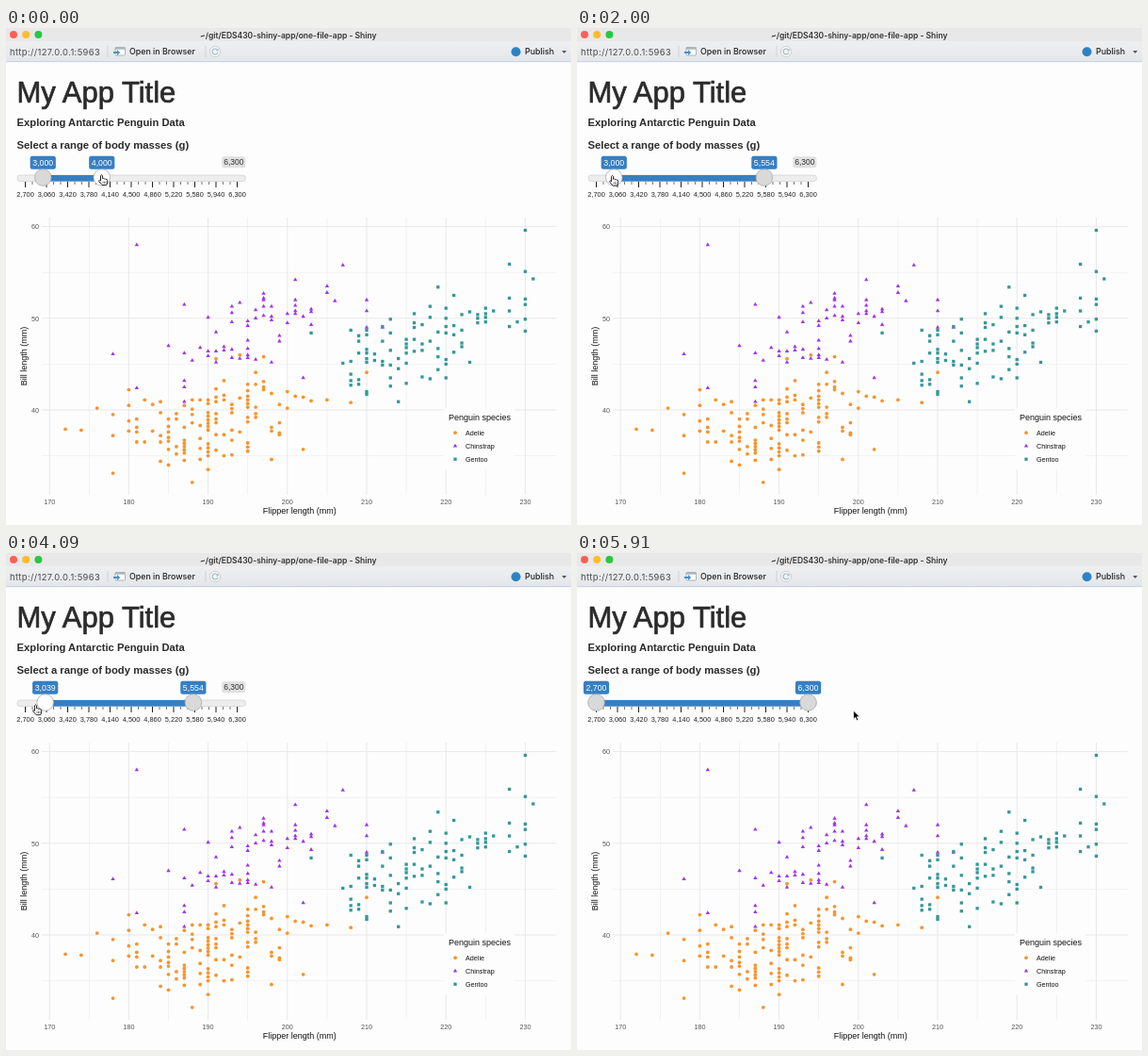
Write an HTML page that moves like this. It is 600 px wide and 527 px high and loops after 5.94 s.

```html
<!DOCTYPE html>
<html lang="en">
<head>
<meta charset="utf-8">
<title>Slider demo</title>
<style>
html, body { margin: 0; width: 100%; height: 100%; overflow: hidden; background: #fdfdfd; }
svg { display: block; width: 100%; height: 100%; font-family: "Liberation Sans", Arial, sans-serif; }
.ui { font-family: Inter, sans-serif; }
.b { font-weight: bold; }
.m { text-anchor: middle; }
.e { text-anchor: end; }
</style>
</head>
<body>
<svg id="stage" viewBox="0 0 600 527"></svg>
<script>
const LOOP = 5940;
const BLUE = '#367fc3';
const stage = document.getElementById('stage');

// One column per flipper length, then bill lengths; a-b is an evenly filled run.
const adelie = `172 37.9/174 37.8/176 40.2/178 33.1 37.2 39.5/180 37.7 38.8 40.5 42.2
/181 36.5 37.6 38.1 39/182 36.5 41.1/183 37.7 40.6/184 34.4 36.5 37.2 39.7 40.9
/185 34 35.7 36.6 37 37.6 38.2 39/186 35.2 36 39 39.6/187 34.5 35.3-36.7 38.1 40.5
/188 32.1 38.6 39.5 40.1 41.1/189 34.6 35.8 36.9 38.3 41.1/190 33.5 35-36.3 37.8-39.7 40.7 41.1
/191 35.6 37.3 38.6-39 39.6 40.9 41.4 42.3 45.6/192 35 37.3 41.1 41.6 43.2
/193 35.1 36.7 37.8 39.7-40.6/194 37.6 41.3 46/195 35.5-36.4 38.7 39.2 40.3-41.5 42.1 42.8
/196 39.2 39.6 40.3 42.8 44.1/197 42.2 42.5 43.1 45.8/198 34.6 37.7 38.1 41.8
/199 37.3 37.5 38.6 40.6/200 40.2 42/201 41.5/202 35.7 41.4/203 41/205 41.1/208 40.8/210 44.1`;
const chinstrap = `178 46.1/181 42.4 58/185 47/187 40.9 42.5 43.2 46.2 51.5/188 45.4/189 46.8
/190 45.9 46.4 50.1/191 45.2 46.4 48.5/192 46.5 46.9/193 45.7 46.6 49.6 50.6 51.3/194 45.6 51.7
/195 45.7 46 46.7 47.6 49.2 49.7/196 45.5 50 50.9/197 50.3 51.3 52 52.2 52.7
/198 45.2 49.8 50.2 51.3/199 47.5 48.1/200 49.5 50.5/201 50.5 50.8 51.4 52 54.2/202 43.5 50.2
/203 49.3 50.7 51/205 52.8 53.5/206 51.9/207 55.8/210 49 50.8 52/212 49`;
const gentoo = `203 48.4/207 45.1/208 42.7 43.2 43.9 45.3 48.7/209 42.8 43.3 46.2 47.5 48.1
/210 41.7 42 45.2 45.6 46.2 46.6 48.2 48.7/211 45.4 46.1/212 44.9 45.3 47.5 49.1
/213 42.6 43.5 44.9 46.5 48.4 49.9/214 40.9 44.5 45.6/215 42.9 45.1 46.2 46.8 47.2 47.7
/216 46.4 47.7 49 49.5 50.5/217 43.6 46.5 47.2 49.3/218 43.4 47.5 50.1 51.3
/219 44.4 45.8 46.7 48.5 53.4/220 43.5 45 45.5 48.4 49.1 50 51.1/221 46.3 48.2 49.2 52.5
/222 46.9 47.3 48.7 50.4/223 45.2 50.7/224 49.5 50 50.4/225 49.6 50.1 50.5 51.1/226 50.8
/228 49.1 50.8 52.2 55.9/229 49.6/230 48.6 49.9 51.5 52.1 55.1 59.6/231 54.3`;

const flipperX = mm => 46.2 + (mm - 170) * 8.42;
const billY = mm => 405 - (mm - 40) * 9.72;
const massX = g => 20.5 + (g - 2700) / 16;
const comma = n => Math.round(n).toLocaleString('en-US');

const text = (x, y, size, str, cls = '', fill = '#333', more = '') =>
  `<text x="${x}" y="${y}" font-size="${size}" class="${cls}" fill="${fill}" ${more}>${str}</text>`;
const rect = (x, y, w, h, fill, r = 0, more = '') =>
  `<rect x="${x}" y="${y}" width="${w}" height="${h}" fill="${fill}" rx="${r}" ${more}/>`;
const circle = (x, y, r, fill, more = '') =>
  `<circle cx="${x}" cy="${y}" r="${r}" fill="${fill}" ${more}/>`;
const path = (d, fill, more = '') => `<path d="${d}" fill="${fill}" ${more}/>`;

const species = [
  ['Adelie', adelie, (x, y) => circle(x, y, 1.9, '#f7942f')],
  ['Chinstrap', chinstrap, (x, y) => path(`M${x} ${y - 2.5}l2.2 3.8h-4.4z`, '#a033ec')],
  ['Gentoo', gentoo, (x, y) => rect(x - 1.65, y - 1.65, 3.3, 3.3, '#349797')]
];

function expand(token) {
  const [a, b] = token.split('-').map(Number);
  if (b === undefined) return [a];
  const n = Math.round((b - a) / .4);
  return Array.from({ length: n + 1 }, (_, i) => a + (b - a) * i / n);
}

function points(data, mark) {
  return data.split('/').map(column => {
    const [x, ...ys] = column.trim().split(' ');
    return ys.flatMap(expand).map(y => mark(flipperX(+x), billY(y))).join('');
  }).join('');
}

function windowBar() {
  const lights = ['#fe5f57', '#febc2e', '#28c840'];
  return `<linearGradient id="bar" x2="0" y2="1"><stop stop-color="#efeff0"/>
      <stop offset="1" stop-color="#e3e6ea"/></linearGradient>`
    + rect(0, 0, 600, 14, '#e9e8e9') + rect(0, 14, 600, 22, 'url(#bar)') + rect(0, 35.2, 600, 1, '#c3d2e6')
    + lights.map((c, i) => circle(8 + i * 13.2, 7, 4, c)).join('')
    + text(299.8, 10.5, 8.5, '~/git/EDS430-shiny-app/one-file-app - Shiny', 'ui m', '#333', 'font-weight="600"')
    + text(4, 28.5, 9.4, 'http://127.0.0.1:5963', 'ui', '#4a4a4a', 'letter-spacing=".38"')
    + [107.5, 211.5].map(x => rect(x, 19, 1, 12, '#d2d2d2')).join('')
    + rect(116, 20.5, 10.5, 8.5, '#fff', 1, 'stroke="#9aa3ab" stroke-width=".8"')
    + rect(116, 20.5, 10.5, 2.2, '#aab4bd')
    + path('M114 25h4v-2l3.2 3-3.2 3v-2h-4z', '#4a8fc8')
    + text(131, 28.4, 8.85, 'Open in Browser', 'ui', '#222', 'font-weight="500"')
    + circle(222, 25, 5.6, '#f6f8f9', 'stroke="#c2c8cc" stroke-width=".8"')
    + path('M224.6 23.4a3 3 0 1 0 .3 2.6', 'none', 'stroke="#9fb4c2" stroke-width="1.1"')
    + path('M225.6 21.8v2.7h-2.7z', '#9fb4c2')
    + circle(541.5, 25.2, 5, '#2b83c6')
    + text(551, 28.4, 8.85, 'Publish', 'ui', '#222', 'font-weight="500"')
    + path('M590.3 24h5l-2.5 3z', '#555');
}

function sliderScale() {
  let out = rect(12, 156, 242.5, 6.6, '#ededed', 3, 'stroke="#cfcfcf" stroke-width=".7"');
  for (let i = 0; i <= 30; i++) {
    const x = 20.5 + i * 7.5, big = i % 3 === 0;
    out += rect(x - .5, 163, 1, big ? 6 : 3, big ? '#222' : '#777');
    if (big) out += text(x, 179.3, 7.4, comma(2700 + i * 120), 'm', '#222');
  }
  return out;
}

function chart() {
  let out = '';
  const vLine = (mm, w, c) => rect(flipperX(mm) - w / 2, 201, w, 294, c);
  const hLine = (mm, w, c) => rect(38, billY(mm) - w / 2, 546.6, w, c);
  for (let mm = 175; mm < 230; mm += 10) out += vLine(mm, .6, '#ececec');
  for (const mm of [35, 45, 55]) out += hLine(mm, .6, '#ececec');
  for (let mm = 170; mm <= 230; mm += 10)
    out += vLine(mm, 1, '#e8e8e8') + text(flipperX(mm), 505, 7.2, mm, 'm', '#555');
  for (const mm of [40, 50, 60])
    out += hLine(mm, 1, '#e8e8e8') + text(35, billY(mm) + 2.8, 7.2, mm, 'e', '#555');
  out += species.map(([, data, mark]) => points(data, mark)).join('');
  out += rect(465, 403.5, 75, 65, '#fdfdfd') + text(470, 416.3, 9, 'Penguin species', '', '#111');
  species.forEach(([name, , mark], i) => {
    const y = 429.2 + i * 14;
    out += mark(477, y) + text(488, y + 2.6, 7.2, name, '', '#111');
  });
  return out + text(311.8, 515.2, 9, 'Flipper length (mm)', 'm', '#111')
    + text(0, 0, 9, 'Bill length (mm)', 'm', '#111', 'transform="translate(22.3 348)rotate(-90)"');
}

stage.innerHTML = windowBar()
  + text(11.5, 79, 31, 'My App Title', '', '#2b2b2b', 'stroke="#2b2b2b" stroke-width=".7"')
  + text(11.5, 103.6, 11.25, 'Exploring Antarctic Penguin Data', 'b', '#2b2b2b')
  + text(11.5, 128.1, 11.3, 'Select a range of body masses (g)', 'b', '#2b2b2b')
  + sliderScale() + chart() + '<g id="live"></g>';
const live = document.getElementById('live');

// Keys are [time, values...], eased in between.
const lowKeys = [[2050, 3000], [3010, 4295], [3150, 4295], [4090, 3039], [4230, 2700]];
const highKeys = [[60, 4000], [760, 5554], [5050, 5554], [5480, 6300]];
const cursorKeys = [[60, 99.5, 155.3], [760, 197.5, 153], [1000, 197.5, 153], [1850, 35.5, 156],
  [2050, 35.5, 156], [3010, 117, 160.5], [3150, 117, 160.5], [4090, 29.5, 160.5], [4230, 16, 160.5],
  [4330, 16, 160.5], [4790, 195, 135.5], [4950, 198, 154], [5050, 198, 154], [5480, 245, 155],
  [5580, 245, 155], [5880, 293.5, 167]];

function at(keys, t) {
  const next = keys.findIndex(k => k[0] > t);
  if (next < 0) return keys[keys.length - 1].slice(1);
  if (next === 0) return keys[0].slice(1);
  const a = keys[next - 1], b = keys[next];
  const u = (t - a[0]) / (b[0] - a[0]), s = u * u * (3 - 2 * u);
  return a.slice(1).map((v, i) => v + (b[i + 1] - v) * s);
}

const limitLabel = (x, g) => rect(x, 136.2, 25, 12, '#e0e0e0', 2.5) + text(x + 12.5, 145.3, 8.5, comma(g), 'm');
const valueLabel = (x, g) => rect(x - 13.6, 135.7, 27.2, 14, BLUE, 2.5) + text(x, 145.8, 8.8, comma(g), 'm', '#fff');
const handle = (x, on) => circle(x, 158.5, 8.8, on ? '#fff' : '#d9d9d9', 'stroke="#ababab" stroke-width=".8"');
const arrow = path('M0 0v9.2l2.1-1.9 1.5 3.4 1.7-.8-1.5-3.2h3z', '#000', 'stroke="#fff" stroke-width=".8"');
const hand = path('M1 1.3Q2-.3 3 1.3V4.3Q4.2 3.4 4.9 4.7 6 4 6.6 5.2 8 4.7 8.2 6.3V8.5L7.2 11.2H2.6L-.7 7.4Q-1.2 6.1.1 6L1 6.8Z',
  '#fff', 'stroke="#111" stroke-width=".9" stroke-linejoin="round"')
  + path('M3.5 7.3v2.4M5 7.3v2.4M6.5 7.3v2.4', 'none', 'stroke="#111" stroke-width=".5"');

function draw(now) {
  const t = now % LOOP;
  const [low] = at(lowKeys, t), [high] = at(highKeys, t), [cx, cy] = at(cursorKeys, t);
  const lx = massX(low), hx = massX(high);
  const over = x => Math.hypot(cx - x, cy - 158.5) < 9.5;
  const lowOn = over(lx) || (t > 2050 && t < 4230), highOn = over(hx);
  live.innerHTML = rect(lx, 156, hx - lx, 6.6, BLUE)
    + (lx - 13.6 > 37 ? limitLabel(11.8, 2700) : '')
    + (hx + 13.6 < 229 ? limitLabel(229.3, 6300) : '')
    + valueLabel(lx, low) + valueLabel(hx, high)
    + handle(lx, lowOn) + handle(hx, highOn)
    + `<g transform="translate(${cx} ${cy})">${lowOn || highOn ? hand : arrow}</g>`;
  requestAnimationFrame(() => draw(performance.now() - start));
}
const start = performance.now();
draw(0);
</script>
</body>
</html>
```
